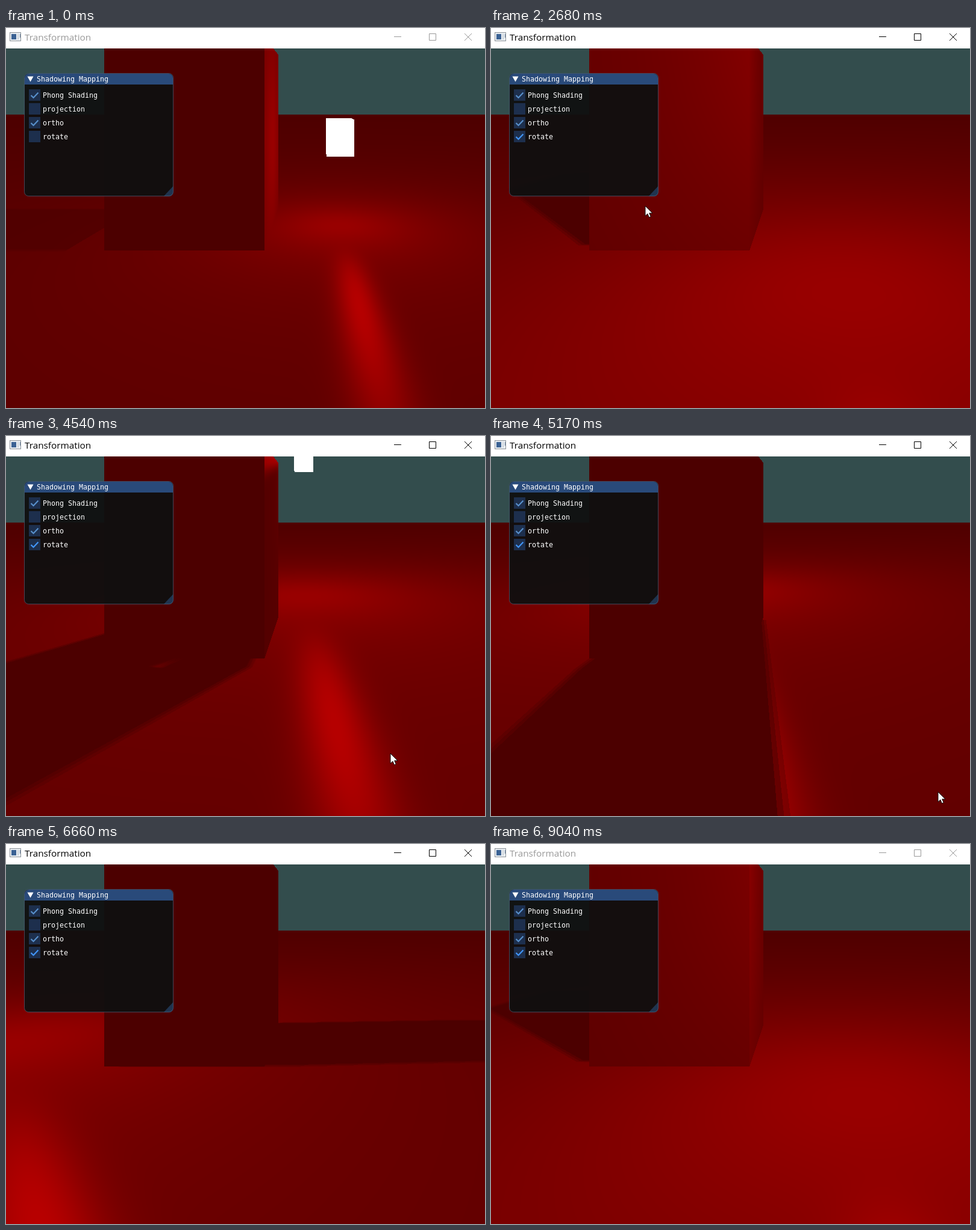
Recreate the animation shown at these times as an HTML page with a canvas. Size 795 by 632 pixels, loop 9.12 s.

```html
<!DOCTYPE html>
<html lang="en">
<head>
<meta charset="utf-8">
<title>Transformation</title>
<style>
  html, body { margin: 0; width: 100%; height: 100%; overflow: hidden; background: #fff; }
  canvas, svg { position: absolute; left: 0; top: 0; display: block; }
  .caption { font: 15.3px "Open Sans", "Noto Sans", sans-serif; }
  .panel { font: 11.63px "DejaVu Sans Mono", monospace; fill: #fff; }
  #bar { color: #000; }
  #bar.inactive { color: #999; }
  .box { fill: #1d2f4d; }
  .box.hover { fill: #23446d; }
  .tick { fill: none; stroke: #5890cb; stroke-width: 2.2; }
</style>
</head>
<body>
<canvas id="stage" width="795" height="632"></canvas>
<svg width="795" height="632" viewBox="0 0 795 632">
  <g id="bar">
    <rect width="795" height="34" fill="#fff"/>
    <rect x="6.5" y="7.5" width="18" height="14" fill="#e9eef2" stroke="#8d9399"/>
    <rect x="9" y="10" width="8" height="9" fill="#3b6294"/>
    <path d="M19 10h2v9h-2z" fill="#ccd3da"/>
    <path d="M23.5 10v6" stroke="#6f87a5"/>
    <text class="caption" x="31" y="21" fill="currentColor">Transformation</text>
    <path d="M644 14.5h12M702.5 9.5h11v11h-11zM761 9l12 12M773 9l-12 12" fill="none" stroke="currentColor"/>
  </g>
  <g class="panel">
    <rect x="30.5" y="75.5" width="247" height="204" rx="7" fill="#0f0f0f" fill-opacity=".94"/>
    <path d="M31 94V83a7 7 0 0 1 7-7h232a7 7 0 0 1 7 7v11z" fill="#294a7a"/>
    <path d="M277.5 263v10a7 7 0 0 1-7 7h-9z" fill="#20344f"/>
    <rect x="30.5" y="75.5" width="247" height="204" rx="7" fill="none" stroke="#56718c" stroke-opacity=".6"/>
    <path d="M35.5 80.5h10l-5 9z" fill="#fff"/>
    <text x="51" y="89">Shadowing Mapping</text>
    <g id="options"></g>
  </g>
  <path id="cursor" d="M0 0V16.5L3.9 12.9L6.4 18.9L9.2 17.7L6.7 11.9H12Z" fill="#fff" stroke="#000" stroke-width=".9"/>
</svg>
<script>
const LOOP = 9120, FOCUS_AT = 1280, ROTATE_AT = 1360, BLUR_AT = 8890;
const W = 795, H = 598, TOP = 34;

// Perspective: vanishing point and focal lengths in pixels.
const VX = 512, VY = 121, FX = 688.5, FY = 918;
const cam = { x: 0.812, y: 0.2022, z: 3.089 };
const eye = { x: 1.04, y: 0.19, z: 3.089 };
const FLOOR = 1, FRONT = 2, RIGHT = 3;
const NEAR = 1, FAR = 7.5, TEXEL = 20 / 1024;

const $ = id => document.getElementById(id);
const ctx = $('stage').getContext('2d');
const image = ctx.createImageData(W, H);
const pixels = new Uint32Array(image.data.buffer);
const px = new Float32Array(W * H), py = new Float32Array(W * H), pz = new Float32Array(W * H);
const surface = new Uint8Array(W * H);

const inCube = v => Math.abs(v) <= 0.5;

// The camera is still, so each pixel's surface point is found once.
function traceScene() {
  for (let i = 0; i < W * H; i++) {
    const dx = (i % W + 0.5 - VX) / FX;
    const dy = (VY - TOP - 0.5 - Math.floor(i / W)) / FY;
    const put = (kind, depth) => {
      surface[i] = kind;
      px[i] = kind === RIGHT ? 0.5 : cam.x + dx * depth;
      py[i] = kind === FLOOR ? -0.5 : cam.y + dy * depth;
      pz[i] = kind === FRONT ? 0.5 : cam.z - depth;
    };
    const front = cam.z - 0.5, side = (0.5 - cam.x) / dx, floor = (-0.5 - cam.y) / dy;
    if (inCube(cam.x + dx * front) && inCube(cam.y + dy * front)) put(FRONT, front);
    else if (side > 0 && inCube(cam.z - side) && inCube(cam.y + dy * side)) put(RIGHT, side);
    else if (floor > 0 && cam.z - floor > -25) put(FLOOR, floor);
    else pixels[i] = 0xff4d4d33;
  }
}

// Orthographic shadow of the unit cube with a 3x3 filter.
function makeShadow(light) {
  const dist = Math.hypot(light.x, light.y, light.z);
  const u = [light.x / dist, light.y / dist, light.z / dist];
  const flat = Math.hypot(u[0], u[2]);
  const r = [-u[2] / flat * TEXEL, 0, u[0] / flat * TEXEL];
  const w = [-u[1] * u[0] / flat * TEXEL, flat * TEXEL, -u[1] * u[2] / flat * TEXEL];
  let enter, leave;

  function slab(p, d) {
    if (Math.abs(d) < 1e-6) return Math.abs(p) <= 0.5001;
    const mid = -p / d, half = 0.5 / Math.abs(d);
    if (mid - half > enter) enter = mid - half;
    if (mid + half < leave) leave = mid + half;
    return enter <= leave;
  }

  return (x, y, z, nl) => {
    const along = x * u[0] + y * u[1] + z * u[2];
    const depth = dist - along;
    if (depth > FAR || x * x + y * y + z * z - along * along > 0.81) return 0;
    const bias = Math.max(0.05 * (1 - nl), 0.005) * (FAR - NEAR);
    let hits = 0;
    for (let a = -1; a <= 1; a++) {
      for (let b = -1; b <= 1; b++) {
        enter = -1e9; leave = 1e9;
        if (slab(x + a * r[0] + b * w[0], u[0]) &&
            slab(y + b * w[1], u[1]) &&
            slab(z + a * r[2] + b * w[2], u[2])) {
          const hit = depth - leave >= NEAR ? leave : enter;
          if (hit > bias && depth - hit >= NEAR) hits++;
        }
      }
    }
    return hits / 9;
  };
}

function shade(light) {
  const shadow = makeShadow(light);
  for (let i = 0; i < W * H; i++) {
    const kind = surface[i];
    if (!kind) continue;
    const x = px[i], y = py[i], z = pz[i];
    let lx = light.x - x, ly = light.y - y, lz = light.z - z;
    const ld = Math.sqrt(lx * lx + ly * ly + lz * lz);
    lx /= ld; ly /= ld; lz /= ld;
    const vx = eye.x - x, vy = eye.y - y, vz = eye.z - z;
    const vd = Math.sqrt(vx * vx + vy * vy + vz * vz);
    const hx = lx + vx / vd, hy = ly + vy / vd, hz = lz + vz / vd;
    const hd = Math.sqrt(hx * hx + hy * hy + hz * hz);
    const nl = kind === FLOOR ? ly : kind === FRONT ? lz : lx;
    const nh = (kind === FLOOR ? hy : kind === FRONT ? hz : hx) / hd;
    let lit = 0.3 * Math.max(nl, 0);
    if (nh > 0.8) lit += 0.3 * Math.pow(nh, 64);
    if (lit > 0.002) lit *= 1 - shadow(x, y, z, nl);
    pixels[i] = 0xff000000 | Math.min(255, 255 * (0.3 + lit));
  }
}

// Sweeping the cross-section from back to front fills the lamp's outline.
function drawLamp(light) {
  ctx.save();
  ctx.beginPath();
  ctx.rect(0, TOP, W, H);
  [[163, 34], [443, 34], [452, 45], [452, 301], [429, 370], [163, 370]]
    .forEach(([x, y], i) => i ? ctx.lineTo(x, y) : ctx.moveTo(x, y));
  ctx.closePath();
  ctx.clip('evenodd');
  ctx.fillStyle = '#fff';
  for (let k = -8; k <= 8; k++) {
    const depth = cam.z - light.z - k / 80;
    const sx = x => Math.round(VX + (x - cam.x) / depth * FX);
    const sy = y => Math.round(VY - (y - cam.y) / depth * FY);
    const x0 = sx(light.x - 0.1), y0 = sy(light.y + 0.1);
    ctx.fillRect(x0, y0, sx(light.x + 0.1) - x0, sy(light.y - 0.1) - y0);
  }
  ctx.restore();
}

function lightAt(t) {
  if (t < ROTATE_AT) return { x: 1, y: 0, z: 0 };
  const angle = t / 1000 - 1.905;
  return { x: 1.5 * Math.sin(angle), y: 0.6, z: 1.5 * Math.cos(angle) };
}

const cursorKeys = [
  [60, 662, 640], [500, 330, 400], [980, 48, 183], [2200, 48, 183], [3060, 420, 385],
  [3610, 477, 426], [4000, 500, 450], [4930, 730, 580], [5170, 742, 592], [5500, 756, 634]
];

function placeCursor(t) {
  const n = cursorKeys.findIndex(key => key[0] > t);
  $('cursor').style.display = n > 0 ? '' : 'none';
  if (n < 1) return;
  const [t0, x0, y0] = cursorKeys[n - 1], [t1, x1, y1] = cursorKeys[n];
  const f = (t - t0) / (t1 - t0);
  $('cursor').setAttribute('transform',
    `translate(${Math.round(x0 + (x1 - x0) * f)} ${Math.round(y0 + (y1 - y0) * f)})`);
}

$('options').innerHTML = ['Phong Shading', 'projection', 'ortho', 'rotate'].map((label, i) => {
  const y = 102 + 23 * i;
  const tick = i === 1 ? '' : `<path class="tick" d="M41.5 ${y + 10}l4 4l8-8.5"/>`;
  return `<rect class="box" x="38" y="${y}" width="19" height="19"/>${tick}
    <text x="61" y="${y + 14}">${label}</text>`;
}).join('');
const rotateBox = [...document.querySelectorAll('.box')].pop();
const rotateTick = [...document.querySelectorAll('.tick')].pop();
rotateTick.style.stroke = '#4296fa';

let shownLight = '';
function frame(now) {
  const t = Math.round(now % LOOP / 40) * 40 % LOOP;
  const light = lightAt(t), key = light.x + ',' + light.z;
  if (key !== shownLight) {
    shownLight = key;
    shade(light);
    ctx.putImageData(image, 0, TOP);
    drawLamp(light);
  }
  $('bar').classList.toggle('inactive', t < FOCUS_AT || t >= BLUR_AT);
  rotateBox.classList.toggle('hover', t >= FOCUS_AT && t < 2240);
  rotateTick.style.display = t >= ROTATE_AT ? '' : 'none';
  placeCursor(t);
}

traceScene();
const start = performance.now();
function tick() {
  frame(performance.now() - start);
  requestAnimationFrame(tick);
}
tick();
</script>
</body>
</html>
```
